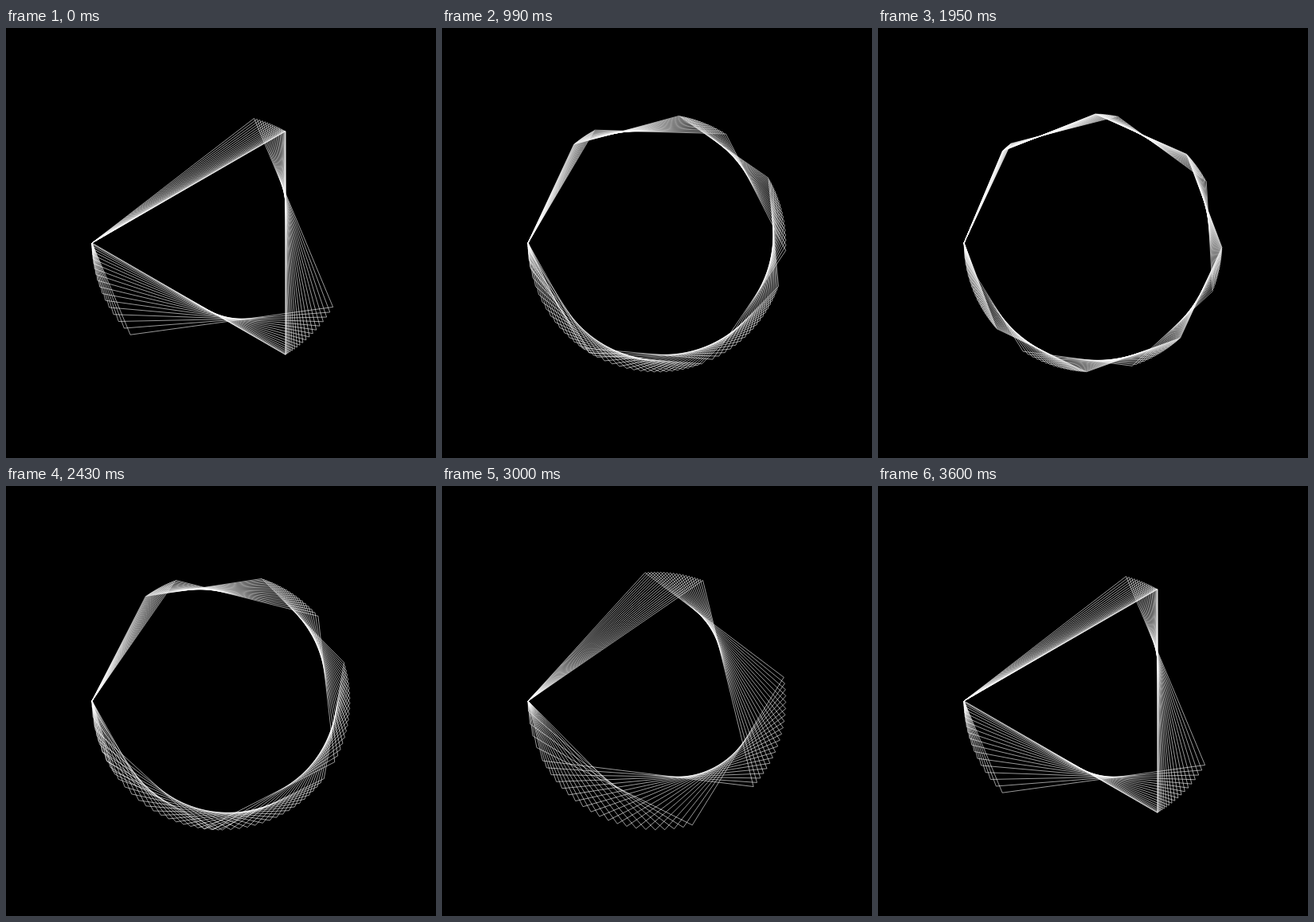
An HTML page with a canvas that plays this animation: 540x540 px, repeating every 3.63 s.

```html
<!DOCTYPE html>
<html lang="en">
<head>
<meta charset="utf-8">
<title>Fractional polygons</title>
<style>
  html, body { margin: 0; height: 100%; overflow: hidden; background: #000; }
  canvas { display: block; }
</style>
</head>
<body>
<canvas id="stage" width="540" height="540"></canvas>
<script>
const ctx = document.getElementById('stage').getContext('2d');
const TAU = 2 * Math.PI;
const CENTER = 270, RADIUS = 162;
const COPIES = 20, PHASE_STEP = TAU / 200;
const STEP_MS = 30, CYCLE_STEPS = 120, LOOP_MS = 3630;

// Vertices step round the circle by TAU / sides; the last edge closes the gap.
function polygon(sides) {
  ctx.beginPath();
  for (let k = 0; k < sides; k++) {
    const angle = Math.PI + k * TAU / sides;
    ctx.lineTo(CENTER + RADIUS * Math.cos(angle), CENTER + RADIUS * Math.sin(angle));
  }
  ctx.closePath();
  ctx.stroke();
}

function draw(ms) {
  const phase = TAU * Math.floor(ms / STEP_MS) / CYCLE_STEPS;
  ctx.fillStyle = '#000';
  ctx.fillRect(0, 0, 540, 540);
  ctx.strokeStyle = '#fff';
  ctx.lineWidth = 0.6;
  for (let i = 0; i < COPIES; i++) {
    polygon(5.5 - 2.5 * Math.cos(phase + i * PHASE_STEP));
  }
}

const start = performance.now();
function tick() {
  draw((performance.now() - start) % LOOP_MS);
  requestAnimationFrame(tick);
}
tick();
</script>
</body>
</html>
```
